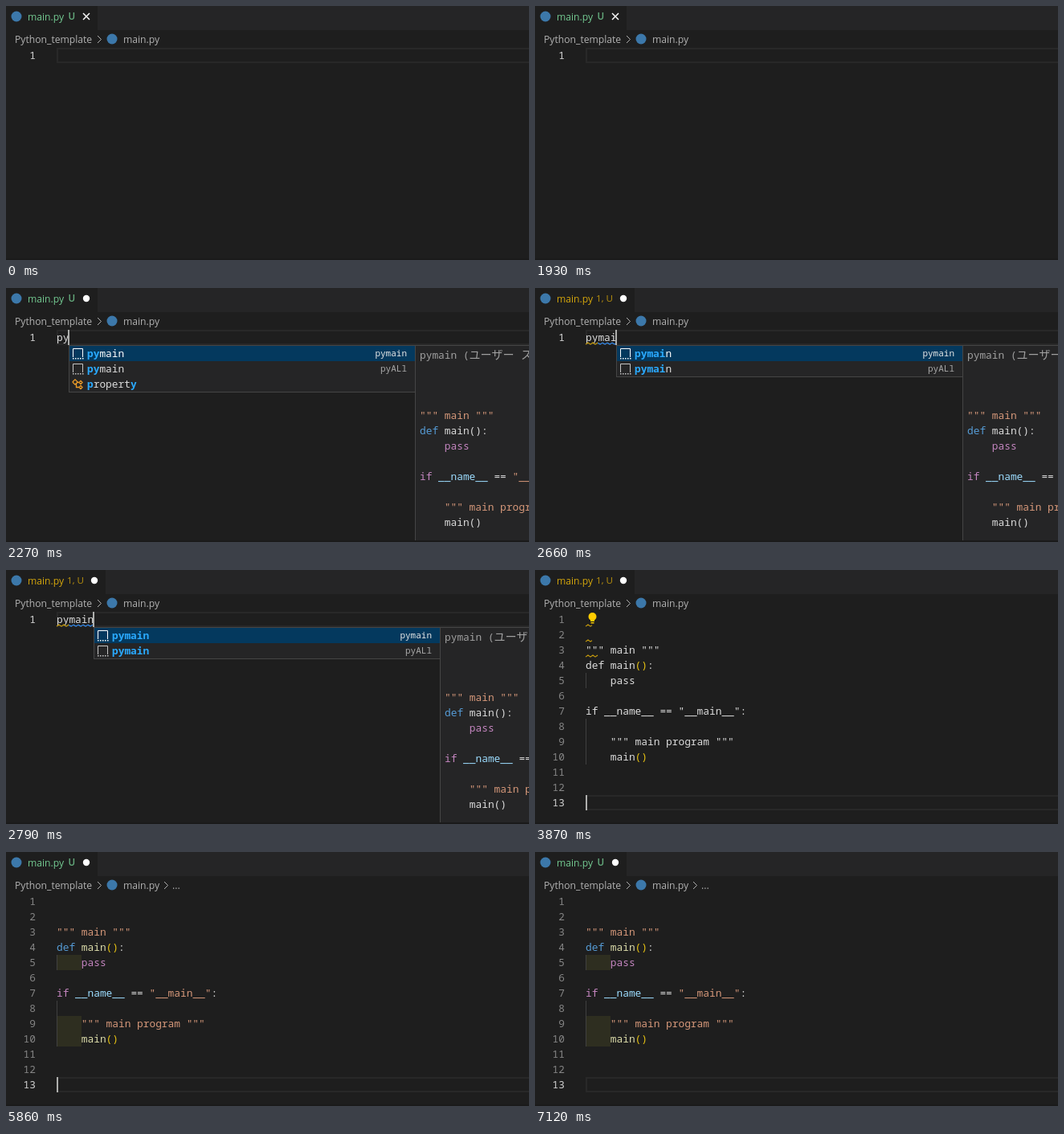
These frames come from a looping animation (651 px wide and 316 px high, 7190 ms). An HTML page with a canvas:

```html
<!DOCTYPE html>
<html lang="en">
<head>
<meta charset="utf-8">
<title>Snippet completion</title>
<style>
html, body { margin: 0; width: 100%; height: 100%; overflow: hidden; background: #1e1e1e; }
canvas { display: block; }
</style>
</head>
<body>
<canvas id="stage" width="651" height="316"></canvas>
<script>
const ctx = document.getElementById('stage').getContext('2d');
const LOOP = 7190, CH = 7.7, LINE = 19, LEFT = 63, TOP = 52;
const MONO = '"Noto Sans Mono", "DejaVu Sans Mono", "Noto Sans CJK JP", monospace';
const UI = '"Open Sans", "Noto Sans", sans-serif';
const CODE_FONT = `500 12.83px ${MONO}`, BOLD_FONT = `700 12.83px ${MONO}`;
const DETAIL_FONT = `500 11px ${MONO}`, UI_FONT = `12.15px ${UI}`;
const TEXT = '#dcdcdc', BG = '#1e1e1e', WIDGET = '#252526', EDGE = '#454545';
const CRUMB = '#b2b2b2', WARN = '#d3a50c', INFO = '#3794ff', GREEN = '#73c991';

const SNIPPET = ['', '', '""" main """', 'def main():', '    pass', '',
  'if __name__ == "__main__":', '', '    """ main program """', '    main()', '', '', ''];
const BLINKS = [460, 920, 1450, 1930, 2130, 3340, 3670, 4410, 4870, 5400, 5860, 6390, 6920, 7120];
const KEYS = [2130, 2200, 2530, 2600, 2660, 2730];
const POPUP = 2270, LINT = 2470, RELINT = 3070, INSERT = 3670, BRACKETS = 3740,
  BULB = 3870, COLOR = 3940, CLEAN = 4130, SEMANTIC = 4200;

const countPast = (times, t) => times.filter(v => v <= t).length;

function rect(x, y, w, h, color) {
  ctx.fillStyle = color;
  ctx.fillRect(x, y, w, h);
}

function frame(x, y, w, h, color, width = 1) {
  ctx.strokeStyle = color;
  ctx.lineWidth = width;
  ctx.strokeRect(x + width / 2, y + width / 2, w - width, h - width);
}

function disc(x, y, r, color) {
  ctx.fillStyle = color;
  ctx.beginPath();
  ctx.arc(x, y, r, 0, 7);
  ctx.fill();
}

function text(str, x, y, color, font = CODE_FONT, align = 'left') {
  ctx.font = font;
  ctx.textAlign = align;
  ctx.fillStyle = color;
  ctx.fillText(str, x, y);
}

function path(points, color, width = 1) {
  ctx.strokeStyle = color;
  ctx.lineWidth = width;
  ctx.beginPath();
  points.forEach(([x, y]) => ctx.lineTo(x, y));
  ctx.stroke();
}

function squiggle(x0, x1, y, color) {
  const points = [];
  for (let x = x0; x <= x1; x++) points.push([x, y + Math.abs((x - LEFT) % 6 - 3) * 0.7]);
  path(points, color, 1.1);
}

// Kinds: s string, k keyword, v variable, f function, b bracket
function tokenColor(token, kinds) {
  const has = k => kinds.includes(k);
  if (token[0] === '"' && has('s')) return '#d6987a';
  if (token === 'def' && has('k')) return '#569cd6';
  if (/^(if|pass)$/.test(token) && has('k')) return '#c586c0';
  if (token === '__name__' && has('v')) return '#9cdcfe';
  if (token === 'main' && has('f')) return '#dcdcaa';
  if (/[()]/.test(token) && has('b')) return '#e8c413';
  return TEXT;
}

function codeLine(line, x, y, kinds) {
  for (const m of line.matchAll(/""".*?"""|"[^"]*"|\w+|[^\s\w]/g))
    text(m[0], x + m.index * CH, y, tokenColor(m[0], kinds));
}

function chevron(x) {
  path([[x, 37], [x + 4.5, 41.5], [x, 46]], CRUMB);
}

function header(t) {
  const warn = t >= LINT && t < CLEAN, dirty = t >= KEYS[0];
  const shift = warn ? 10 : 0, color = warn ? WARN : GREEN;
  rect(0, 0, 651, 30, WIDGET);
  rect(0, 0, 114 + shift, 30, BG);
  disc(13, 13, 6.5, '#3c78aa');
  text('main.py', 27, 18, color, UI_FONT);
  ctx.globalAlpha = 0.85;
  text(warn ? '1, U' : 'U', warn ? 76 : 77.5, 17, color, `${warn ? 400 : 600} 11.6px ${UI}`);
  ctx.globalAlpha = 1;
  if (dirty) disc(100 + shift, 13, 4.2, '#fff');
  else {
    path([[96, 9], [104, 17]], '#fff', 1.5);
    path([[104, 9], [96, 17]], '#fff', 1.5);
  }

  text('Python_template', 11, 46, CRUMB, UI_FONT);
  chevron(114);
  disc(132, 41, 6.5, '#3c78aa');
  text('main.py', 146, 46, CRUMB, UI_FONT);
  if (t >= CLEAN) {
    chevron(197);
    text('...', 207, 46, CRUMB, UI_FONT);
  }
}

function snippetIcon(x, y, color) {
  path([[x + 0.5, y + 11], [x + 0.5, y + 0.5], [x + 12.5, y + 0.5], [x + 12.5, y + 11]], color);
  for (let i = 0; i < 13; i += 3) rect(x + i, y + 12, 1.5, 1.5, color);
}

function classIcon(x, y) {
  const color = '#ee9d28';
  const diamond = (cx, cy, r) =>
    path([[cx - r, cy], [cx, cy - r], [cx + r, cy], [cx, cy + r], [cx - r, cy]], color, 1.3);
  diamond(x + 4, y + 4, 3.2);
  diamond(x + 11, y + 4.5, 2);
  diamond(x + 11, y + 10.5, 2);
  path([[x + 6, y + 4.5], [x + 9, y + 4.5]], color, 1.3);
  path([[x + 5.5, y + 5], [x + 5.5, y + 10.5], [x + 9, y + 10.5]], color, 1.3);
}

function popup(typed) {
  const x = Math.floor(LEFT + typed * CH), y = TOP + LINE, docs = x + 431;
  const rows = [['pymain', 'pymain'], ['pymain', 'pyALl']];
  if (typed < 3) rows.push(['property', '']);
  const h = rows.length * LINE + 2;
  rect(x, y, 432, h, WIDGET);
  rect(x + 1, y + 1, 430, LINE, '#04395e');
  frame(x, y, 432, h, EDGE);
  rows.forEach(([name, detail], i) => {
    const base = y + 15 + i * LINE, isClass = name === 'property';
    if (isClass) classIcon(x + 4, base - 11);
    else snippetIcon(x + 5, base - 11, i ? '#c5c5c5' : '#fff');
    [...name].forEach((char, k) => {
      const hit = isClass ? char === 'y' || k === 0 : k < typed;
      text(char, x + 23 + k * CH, base, hit ? '#2aaaff' : i ? TEXT : '#fff', hit ? BOLD_FONT : CODE_FONT);
    });
    text(detail, x + 421, base - 1, i ? '#a8a8a8' : '#e6e6e6', DETAIL_FONT, 'right');
  });

  rect(docs, y, 430, 260, WIDGET);
  frame(docs, y, 430, 260, EDGE);
  text('pymain (', docs + 6, 88, '#a0a0a0');
  text('ユーザー スニペット)', docs + 6 + 8 * CH, 88, '#a0a0a0', `14px ${MONO}`);
  SNIPPET.forEach((line, i) => codeLine(line, docs + 6, 125 + i * LINE, 'skv'));
}

function lightbulb() {
  disc(71.5, 58, 5, '#ffcc00');
  rect(69, 61, 5, 3, '#ffcc00');
  rect(69.5, 65, 4, 1.5, '#ffcc00');
}

function typing(t) {
  const typed = countPast(KEYS, t), end = LEFT + typed * CH;
  text('pymain'.slice(0, typed), LEFT, 66, TEXT);
  if (t >= LINT) {
    const split = t >= RELINT ? end : LEFT + 2 * CH;
    squiggle(LEFT, split, 68, WARN);
    if (split < end) squiggle(split, end, 68, INFO);
  }
  if (t >= POPUP) popup(typed);
}

function program(t) {
  const kinds = (t >= COLOR ? 'skv' : '') + (t >= BRACKETS ? 'b' : '') + (t >= SEMANTIC ? 'f' : '');
  if (t >= COLOR) {
    rect(LEFT, TOP + 4 * LINE, 31, LINE, '#2e2e20');
    rect(LEFT, TOP + 8 * LINE, 31, 2 * LINE, '#2e2e20');
  }
  rect(LEFT, TOP + 4 * LINE, 1, LINE, '#404040');
  rect(LEFT, TOP + 7 * LINE, 1, 3 * LINE, '#404040');
  SNIPPET.forEach((line, i) => codeLine(line, LEFT, 66 + i * LINE, kinds));
  if (t < CLEAN) {
    [8, 8, 15].forEach((w, i) => squiggle(LEFT, LEFT + w, 68 + i * LINE, WARN));
    if (t >= BULB) lightbulb();
  }
}

function draw(t) {
  const inserted = t >= INSERT, row = inserted ? 12 : 0, y = TOP + row * LINE;
  rect(0, 0, 651, 316, BG);
  header(t);
  for (let i = 0; i <= row; i++)
    text(i + 1, 37, 66 + i * LINE, i === row ? '#d0d0d0' : '#858585', CODE_FONT, 'right');
  frame(LEFT, y, 600, LINE, '#282828', 2);
  if (inserted) program(t);
  else typing(t);
  if (countPast(BLINKS, t) % 2) {
    const column = inserted ? 0 : countPast(KEYS, t);
    rect(Math.max(LEFT, Math.floor(LEFT + column * CH) - 1), y, 2, LINE, '#aeafad');
  }
  rect(0, 314, 651, 2, '#1a1a1a');
}

const start = performance.now();
function tick() {
  draw((performance.now() - start) % LOOP);
  requestAnimationFrame(tick);
}
tick();
</script>
</body>
</html>
```
